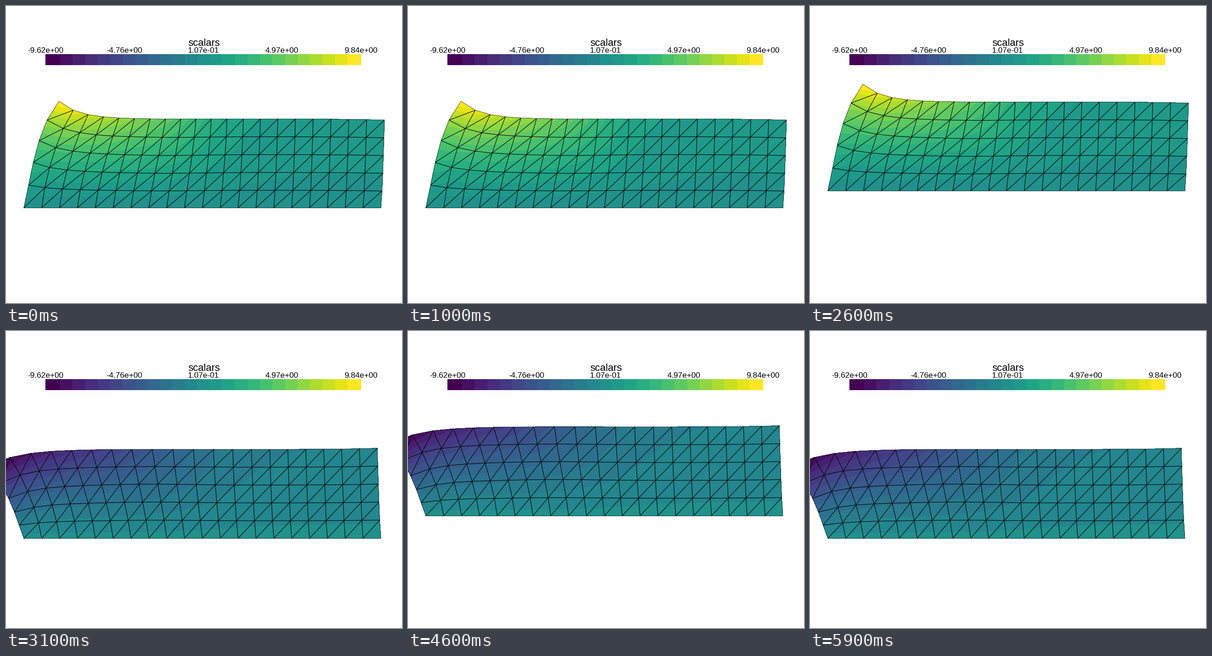
Recreate the animation shown at these times as a matplotlib script. Size 864 by 648 pixels, loop 6 s.

```python
import numpy as np
import matplotlib.pyplot as plt
from matplotlib.animation import FuncAnimation
from matplotlib.collections import LineCollection
from matplotlib.tri import Triangulation

W, H, DPI = 864, 648, 100
PX = 72 / DPI                      # one pixel in points
FRAMES, PERIOD = 60, 20
NX, NY = 20, 5
X0, BASE, CELL = 38.95, 440.2, 38.95
UNIT = 7.79                        # pixels per length unit
LOW, HIGH = -9.624, 9.838
LIFT = 39                          # amplitude of the vertical swing

# Colour bar: even cells between slightly wider end cells.
BINS = 25
EDGES = np.r_[86, np.linspace(118, 745, BINS - 1), 775]
COLORS = plt.get_cmap("viridis")(np.linspace(0, 1, BINS))


def pull(col, h):
    """Sideways displacement in pixels at height h (0 base, 1 top)."""
    far = 7.8 * h ** 0.7
    loaded = 1 / (1 + np.exp((col - 10.7 + h) / 1.5))
    body = 63 * h ** 1.7 * np.exp(-0.09 * h * col) * loaded
    tip = 5.9 * h ** 10 * np.exp(-col / 2.2)
    heel = 36 * h * (1 - h) ** 3 * np.exp(-2.5 * col)
    return far + body + tip + heel


def rise(col, h):
    """Upward displacement in pixels at height h."""
    corner = 37.5 * np.sin(np.pi * h / 2) ** 1.1 * np.exp(-0.72 * col)
    dip = 8 * h * (1.05 - h) * np.exp(-((col - 7.5) / 3) ** 2)
    end = 2.6 * h ** 0.3 * np.exp((col - NX) / 2)
    return corner - dip - end


def deform(side):
    """Node positions and scalars for a pull to the right (1) or left (-1)."""
    row, col = np.mgrid[0:NY + 1, 0:NX + 1]
    h = row / NY
    ux = side * pull(col, h)
    sag = 0.8 * (row > 0) * np.clip(col / 4, 0, 1)
    x = X0 + CELL * col + ux
    y = BASE - CELL * row - side * rise(col, h) + sag
    return x.ravel(), y.ravel(), ux.ravel() / UNIT


def build_mesh():
    """Triangles, inner edges and outline edges as node indices."""
    n = np.arange((NX + 1) * (NY + 1)).reshape(NY + 1, NX + 1)
    a, b = n[:-1, :-1].ravel(), n[:-1, 1:].ravel()
    d, e = n[1:, :-1].ravel(), n[1:, 1:].ravel()
    triangles = np.r_[np.c_[a, b, e], np.c_[a, e, d]]

    def along(lines):
        return np.c_[lines[:, :-1].ravel(), lines[:, 1:].ravel()]

    inner = np.r_[np.c_[a, e], along(n[1:-1]), along(n.T[1:-1])]
    outer = np.r_[along(n[::NY]), along(n.T[::NX])]
    return triangles, inner, outer


def stage_axes():
    ax = fig.add_axes([0, 0, 1, 1])
    ax.set_axis_off()
    ax.set_autoscale_on(False)
    return ax


def draw_plate(side):
    ax = stage_axes()
    x, y, scalars = deform(side)
    triangles, inner, outer = build_mesh()
    levels = np.interp(EDGES, EDGES[[0, -1]], [LOW, HIGH])
    levels[[0, -1]] += -0.5, 0.5
    ax.tricontourf(Triangulation(x, y, triangles), scalars,
                   levels=levels, colors=COLORS)
    points = np.column_stack([x, y])
    for pairs, width in ((inner, 1.1), (outer, 0.6)):
        ax.add_collection(LineCollection(points[pairs], colors="black",
                                         linewidths=width * PX), autolim=False)
    ax.set(xlim=(0, W), ylim=(H, 0))
    return ax


def draw_bar():
    ax = stage_axes()
    ax.bar(EDGES[:-1], 24, np.diff(EDGES), bottom=105, align="edge",
           color=COLORS, linewidth=0, antialiased=False)
    style = dict(ha="center", va="baseline", color="black", family="Liberation Sans")
    ax.text(432, 87, "scalars", fontsize=22 * PX, **style)
    for x, value in zip(np.linspace(86.5, 774, 5), np.linspace(LOW, HIGH, 5)):
        ax.text(x, 101.5, f"{value:.2e}", fontsize=17.3 * PX, **style)
    ax.set(xlim=(0, W), ylim=(H, 0))


fig = plt.figure(figsize=(W / DPI, H / DPI), dpi=DPI, facecolor="white")
pulled_right, pulled_left = draw_plate(1), draw_plate(-1)
draw_bar()


def update(i):
    shift = LIFT * np.sin(2 * np.pi * i / PERIOD)
    first = i < FRAMES // 2
    pulled_right.set_visible(first)
    pulled_left.set_visible(not first)
    for ax in (pulled_right, pulled_left):
        ax.set_ylim(H + shift, shift)
    return pulled_right, pulled_left


anim = FuncAnimation(fig, update, frames=FRAMES, interval=100, repeat=True,
                     repeat_delay=0, blit=False)
plt.show()
```
